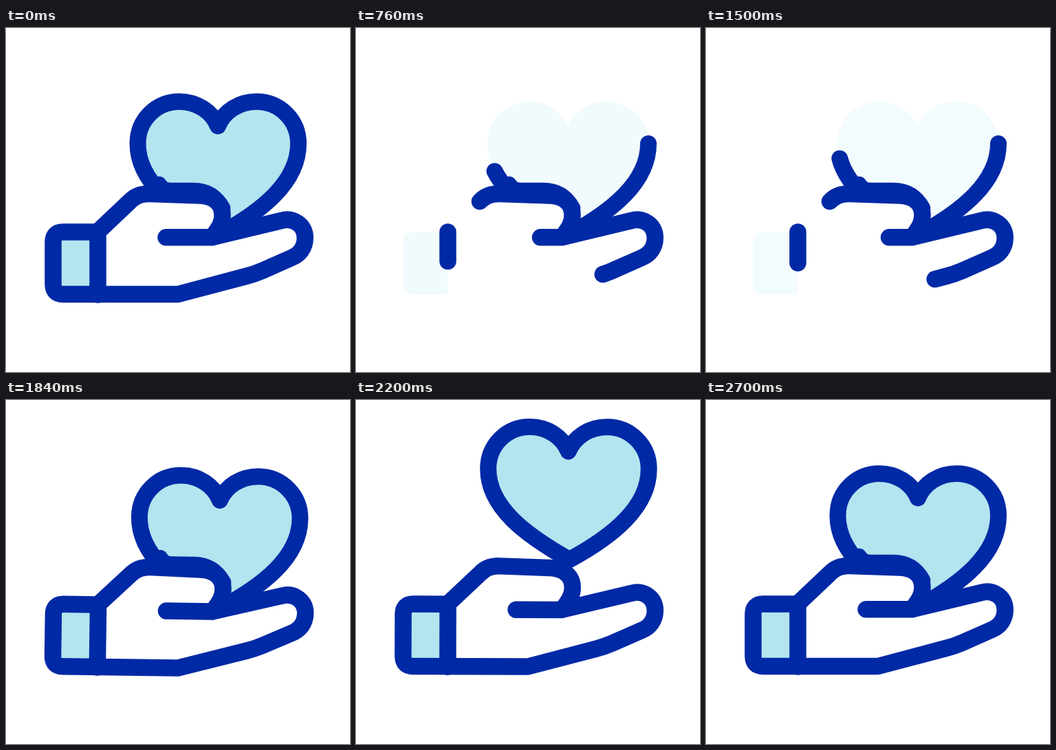
An HTML page for the animation above (3000 ms loop, 500x500 px).

```html
<!DOCTYPE html>
<html lang="en">
<head>
<meta charset="utf-8">
<title>Heart in hand</title>
<style>
  html, body { margin: 0; width: 100%; height: 100%; overflow: hidden; background: #fff; }
  svg { display: block; width: 100%; height: 100%; }
  .line { fill: none; stroke: #0029a6; stroke-width: 24.5; stroke-linecap: round; stroke-linejoin: round; }
  .tint { fill: #b2e5ef; }
</style>
</head>
<body>
<svg viewBox="0 0 500 500">
  <defs>
    <path id="heartShape" pathLength="1" d="M425 168C425 224 372 266 310 300C246 264 191.5 224 191.5 168
      C191.5 134 218 107 252 107C277 107 299 121 308 142.5C317 121 339 107 364 107C398 107 425 134 425 168Z"/>
    <path id="handShape" pathLength="1" d="M180 252C187 244.500 197 240.500 209 241L282 243.500
      C300 244.500 314.500 254 314.500 272C314.500 285 308 292 300 304L400 280
      C418 274.500 434.700 287 434.700 305C434.700 319 427 329 415 334L372 353C365 356 358 358.500 350 360.500
      L250 387H83Q68.500 387 68.500 372V311Q68.500 296.500 83 296.500H133Z"/>
    <clipPath id="heartClip"><use class="lift" href="#heartShape"/></clipPath>
  </defs>
  <g id="scene">
    <use class="lift tint" href="#heartShape"/>
    <g clip-path="url(#heartClip)">
      <path id="rim" class="line" pathLength="1" d="M314 262C305 246 292 237 272 237H240C232 237 228 236 222 228"/>
    </g>
    <use class="lift line trim" href="#heartShape" style="stroke-width:24"/>
    <use href="#handShape" fill="#fff"/>
    <path class="tint" d="M133 387H83Q68.500 387 68.500 372V311Q68.500 296.500 83 296.500H133Z"/>
    <use class="line trim" href="#handShape"/>
    <path class="line trim" pathLength="1" d="M133.500 296.500V387.500"/>
    <path class="line trim" pathLength="1" d="M299 304.300H232.500"/>
  </g>
</svg>
<script>
const LOOP = 3000;
const all = selector => [...document.querySelectorAll(selector)];
const scene = document.getElementById('scene');
const rim = document.getElementById('rim');
const trims = all('.trim'), tints = all('.tint'), lifts = all('.lift');

const clamp = x => Math.min(1, Math.max(0, x));
const ease = (time, from, to) => {
  const x = clamp((time - from) / (to - from));
  return x * x * (3 - 2 * x);
};

function reveal(el, amount) {
  el.style.strokeDasharray = amount < 1 ? `${amount} 2` : 'none';
  el.style.visibility = amount > 0 ? 'visible' : 'hidden';
}

function draw(t) {
  const drawn = 1 - ease(t, 500, 1000) + ease(t, 1250, 1755);
  const tint = 1 - ease(t, 500, 860) + ease(t, 1400, 1780);
  const tilt = 7.4 * (ease(t, 1800, 2000) - ease(t, 2000, 2220));
  const lift = -85 * (ease(t, 2000, 2280) - ease(t, 2450, 2700));

  trims.forEach(el => reveal(el, drawn));
  reveal(rim, clamp((drawn - 0.22) / 0.2));
  tints.forEach(el => el.style.opacity = tint);
  lifts.forEach(el => el.setAttribute('transform', `translate(0 ${lift})`));
  scene.setAttribute('transform', `rotate(${tilt} 68 340)`);
}

const start = performance.now();
function tick() {
  draw((performance.now() - start) % LOOP);
  requestAnimationFrame(tick);
}
tick();
</script>
</body>
</html>
```
